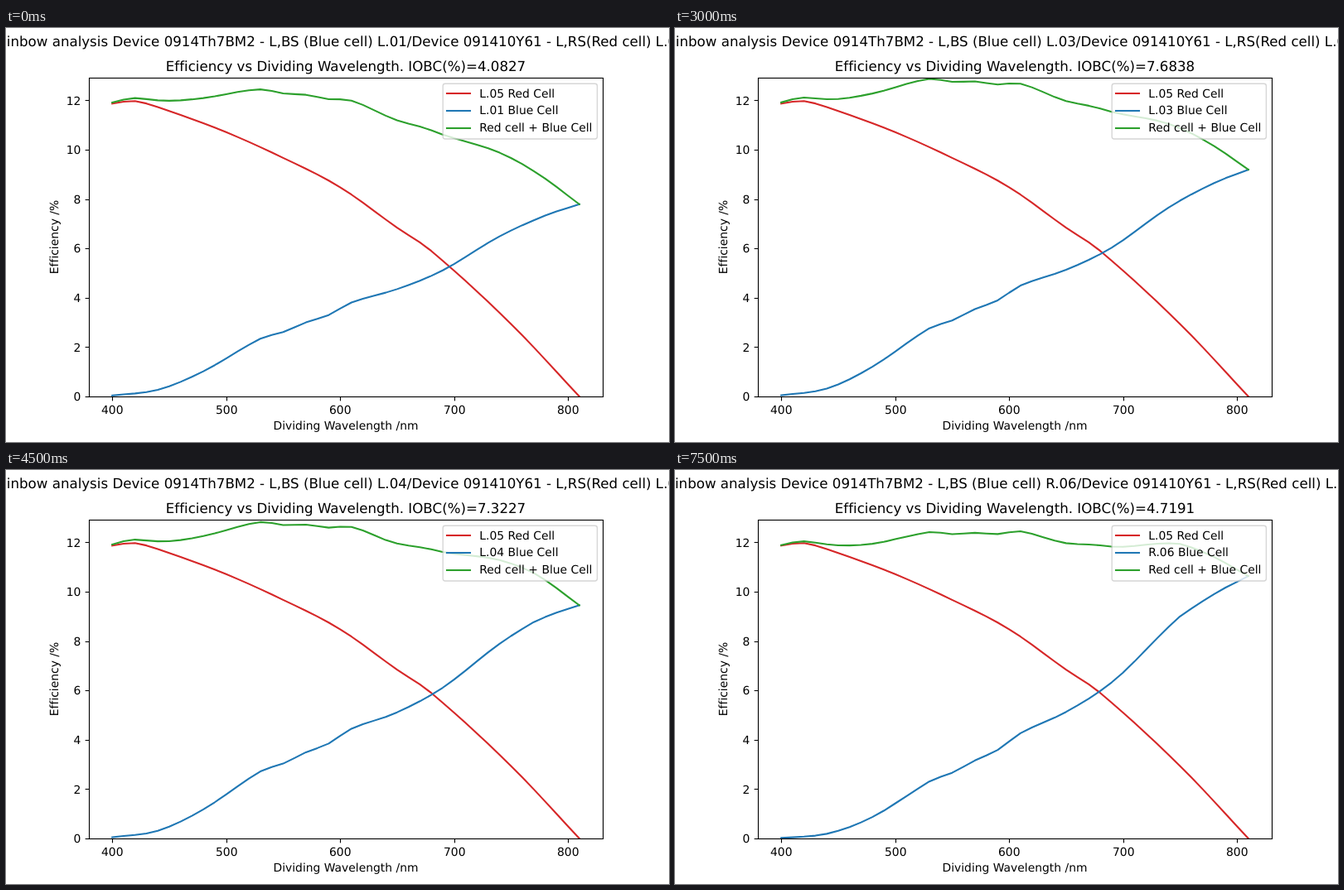
Recreate the animation shown at these times as an HTML page. Size 800 by 500 pixels, loop 8000 ms.

```html
<!DOCTYPE html>
<html lang="en">
<head>
<meta charset="utf-8">
<title>Efficiency vs Dividing Wavelength</title>
<style>
html, body { margin: 0; width: 100%; height: 100%; overflow: hidden; background: #fff; }
#stage { display: block; width: 100vw; height: 100vh; }
text {
  font: 13.889px "DejaVu Sans", sans-serif;
  font-variant-ligatures: none;
  text-rendering: geometricPrecision;
}
.title { font-size: 16.667px; }
.mid { text-anchor: middle; }
.end { text-anchor: end; }
.curve { fill: none; stroke-width: 2.083; stroke-linejoin: round; stroke-linecap: square; }
.axis { fill: none; stroke: #000; stroke-width: 1.11; }
#slides { animation: slides 8s step-end infinite; }
@keyframes slides {
  0% { transform: translateY(0); }
  18.75% { transform: translateY(-500px); }
  37.5% { transform: translateY(-1000px); }
  56.25% { transform: translateY(-1500px); }
  75% { transform: translateY(-2000px); }
  93.75%, 100% { transform: translateY(-2500px); }
}
</style>
</head>
<body>
<svg id="stage" viewBox="0 0 800 500">
  <clipPath id="plot"><rect x="100" y="60" width="620" height="385.5"/></clipPath>
  <g id="slides"></g>
</svg>
<script>
const RED = '#d62728', BLUE = '#1f77b4', GREEN = '#2ca02c';
const wavelengths = Array.from({ length: 42 }, (_, i) => 400 + i * 10);

// Key points are written as "nm:value".
const parseKnots = str => str.split(' ').map(k => k.split(':').map(Number));
const slope = ([x0, y0], [x1, y1]) => (y1 - y0) / (x1 - x0);
const segmentEnd = (knots, x) => Math.max(1, knots.findIndex(k => k[0] >= x));

function linear(str) {
  const knots = parseKnots(str);
  return x => {
    const i = segmentEnd(knots, x), a = knots[i - 1];
    return a[1] + slope(a, knots[i]) * (x - a[0]);
  };
}

// Cubic Hermite curve with tangents taken from the neighbouring points.
function spline(str) {
  const knots = parseKnots(str), last = knots.length - 1;
  const tangent = i => slope(knots[Math.max(0, i - 1)], knots[Math.min(last, i + 1)]);
  return x => {
    const i = segmentEnd(knots, x);
    const [x0, y0] = knots[i - 1], [x1, y1] = knots[i];
    const h = x1 - x0, t = (x - x0) / h, s = 1 - t;
    return s * s * ((1 + 2 * t) * y0 + t * h * tangent(i - 1)) +
      t * t * ((1 + 2 * s) * y1 - s * h * tangent(i));
  };
}

const redCell = spline('400:11.87 420:11.97 450:11.57 500:10.71 550:9.67 600:8.48 650:6.84 680:5.9 750:2.94 810:0');
const blueBase = spline('400:.04 440:.27 480:1.02 530:2.34 550:2.61 570:3 590:3.3 610:3.81 650:4.35 690:5.11 740:6.49 780:7.33 810:7.79');

// Each blue cell is the base curve times a gain that varies with wavelength.
const cells = [
  { name: 'L.01', iobc: '4.0827', gain: '400:1 810:1' },
  { name: 'L.02', iobc: '5.9263', gain: '400:0 450:1 460:.64 470:.71 480:1.08 520:1.15 530:1.02 600:1.1 680:1.13 690:1.2 730:1.195 740:1.15 780:1.16 790:1.2 810:1.2' },
  { name: 'L.03', iobc: '7.6838', gain: '400:1.18 810:1.18' },
  { name: 'L.04', iobc: '7.3227', gain: '400:1.15 640:1.17 700:1.2 770:1.228 810:1.213' },
  { name: 'R.05', iobc: '0.0020', gain: '400:.012 810:.021' },
  { name: 'R.06', iobc: '4.7191', gain: '400:.5 450:.75 500:.92 530:.987 610:1.12 700:1.252 750:1.338 810:1.365' }
];

const px = nm => 128.18 + (nm - 400) * 1.37472;
const py = value => 445 - value * 29.8;
const snap = v => Math.round(v) + 0.5;

const text = (x, y, str, cls = '', extra = '') =>
  `<text x="${x}" y="${y}" class="${cls}" ${extra}>${str}</text>`;

const curve = (fn, color) => {
  const points = wavelengths.map(nm => `${px(nm).toFixed(2)},${py(fn(nm)).toFixed(2)}`);
  return `<polyline class="curve" stroke="${color}" points="${points.join(' ')}"/>`;
};

function axes() {
  let out = '<rect class="axis" x="100.5" y="60.5" width="620" height="385"/>';
  for (let nm = 400; nm <= 800; nm += 100) {
    out += `<path class="axis" d="M${snap(px(nm))} 445.5v4.86"/>` +
      text(Math.round(px(nm)) + 0.25, 466, nm, 'mid');
  }
  for (let v = 0; v <= 12; v += 2) {
    out += `<path class="axis" d="M100.5 ${snap(py(v))}h-4.86"/>` +
      text(90.3, Math.round(py(v) + 5.2), v, 'end');
  }
  return out + text(410, 485, 'Dividing Wavelength /nm', 'mid') +
    text(0, 0, 'Efficiency /%', 'mid', 'transform="translate(63 252.5) rotate(-90)"');
}

function legend(name) {
  const rows = [['L.05 Red Cell', RED], [`${name} Blue Cell`, BLUE], ['Red cell + Blue Cell', GREEN]];
  return '<rect x="527.2" y="67.2" width="186.2" height="66.8" rx="2.78" fill="#fff" stroke="#ccc" stroke-width="1.39" opacity=".8"/>' +
    rows.map(([label, color], i) =>
      `<path class="curve" stroke="${color}" d="M532 ${79 + i * 21}h28"/>` +
      text(571.3, Math.floor(84 + i * 20.5), label)).join('');
}

function slide({ name, iobc, gain }, i) {
  const gainAt = linear(gain);
  const blue = nm => blueBase(nm) * gainAt(nm);
  const sum = nm => redCell(nm) + blue(nm);
  return `<svg y="${i * 500}" width="800" height="500">
    <g clip-path="url(#plot)">${curve(redCell, RED)}${curve(blue, BLUE)}${curve(sum, GREEN)}</g>
    ${axes()}${legend(name)}
    ${text(399.5, 22, `Rainbow analysis Device 0914Th7BM2 - L,BS (Blue cell) ${name}/Device 091410Y61 - L,RS(Red cell) L.05`, 'title mid')}
    ${text(410, 52, `Efficiency vs Dividing Wavelength. IOBC(%)=${iobc}`, 'title mid')}
  </svg>`;
}

document.getElementById('slides').innerHTML = cells.map(slide).join('');
</script>
</body>
</html>
```
